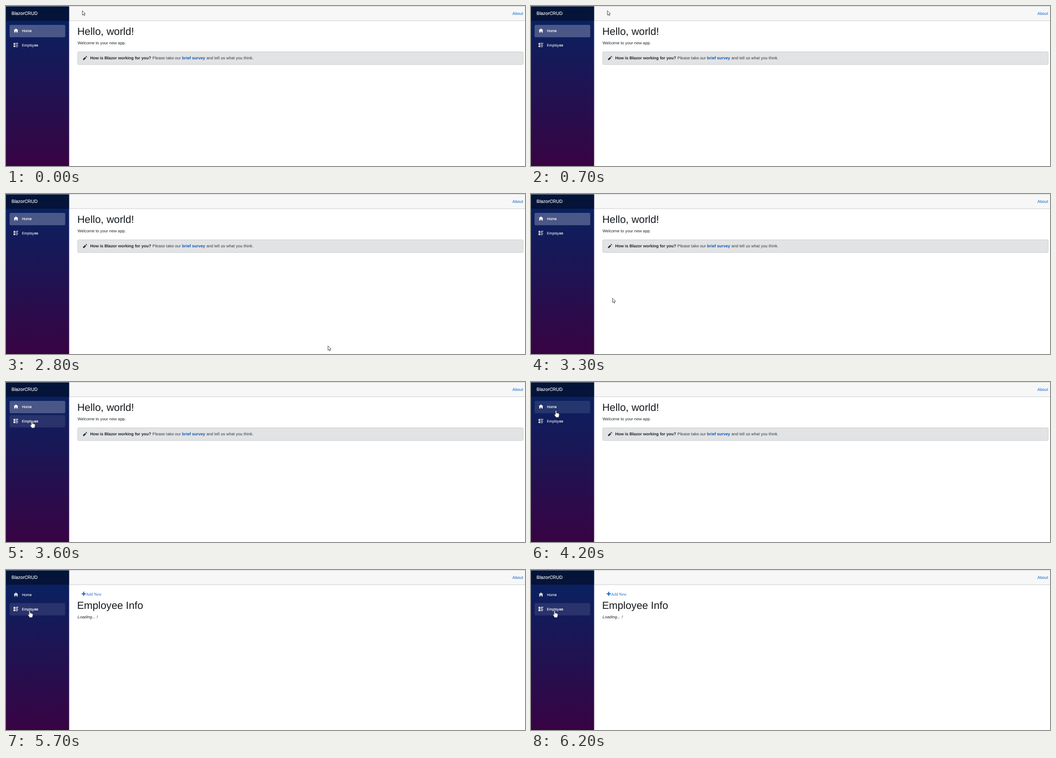
Write an HTML page that moves like this. It is 934 by 288 pixels and loops after 8 s.

```html
<!DOCTYPE html>
<html lang="en">
<head>
<meta charset="utf-8">
<title>BlazorCRUD</title>
<style>
  html, body { margin: 0; width: 100%; height: 100%; overflow: hidden; background: #fff; }
  svg { display: block; width: 934px; height: 288px; }
  text {
    font: 7.35px "Liberation Sans", Arial, sans-serif;
    text-rendering: geometricPrecision;
    fill: #212529;
    white-space: pre;
  }
  .title { font-size: 18.6px; fill: #15191d; }
  .brand { font-size: 8.2px; fill: #fff; stroke: #fff; stroke-width: .12; }
  .nav text { font-size: 6.65px; fill: inherit; stroke: #fff; stroke-width: .1; }
  .bold { font-weight: bold; }
  .italic { font-style: italic; }
  .link { fill: #1062c6; }
  .serif { font-family: "Liberation Serif", "Times New Roman", serif; }
  .alert text { fill: #383d41; }
  .alert .bold { fill: #1f2225; }
  .alert .link { fill: #0b58b8; }
</style>
</head>
<body>
<svg viewBox="0 0 934 288">
  <defs>
    <linearGradient id="side" x1="0" y1="0" x2="0" y2="1">
      <stop offset="0" stop-color="#052463"/>
      <stop offset="1" stop-color="#380343"/>
    </linearGradient>
  </defs>

  <rect width="934" height="288" fill="#fff"/>
  <rect x="113.6" width="821" height="26" fill="#f7f7f7"/>
  <rect x="113.6" y="26" width="821" height="1" fill="#d6d5d5"/>
  <text class="link" x="911.3" y="15.9">About</text>

  <rect width="113.6" height="288" fill="url(#side)"/>
  <rect width="113.6" height="26.5" fill="#000" fill-opacity=".42"/>
  <rect width="934" height=".6" fill="#c4c4c8"/>
  <text class="brand" x="10" y="16.4">BlazorCRUD</text>

  <g class="nav" id="home">
    <rect x="6.4" y="34" width="100.2" height="22.2" rx="2" fill="#fff"/>
    <path transform="translate(13.8 40.6) scale(1.03)" d="M4 0L0 3h1v4h2V5h2v2h2V3h1z"/>
    <text x="28.5" y="47.2">Home</text>
  </g>
  <g class="nav" id="employee">
    <rect x="6.4" y="59.6" width="100.2" height="22.2" rx="2" fill="#fff"/>
    <path transform="translate(13.6 66.6) scale(1.05)"
      d="M0 0v3h3V0zM4 0v1h4V0zM4 2v1h3V2zM0 4v3h3V4zM4 4v1h4V4zM4 6v1h3V6z"/>
    <text x="28.5" y="72.9">Employee</text>
  </g>

  <g id="welcome">
    <text class="title" x="128.2" y="52">Hello, world!</text>
    <text x="128.8" y="68.6">Welcome to your new app.</text>
    <g class="alert">
      <rect x="129" y="82.5" width="801.8" height="22.8" rx="2" fill="#e2e3e5" stroke="#c6c8cc" stroke-width=".8"/>
      <path transform="translate(138.7 89.8) scale(.92)" fill="#26292c" d="M6 0L5 1l2 2 1-1zM4 2L0 6v2h2l4-4z"/>
      <text class="bold" x="151.5" y="96.2">How is Blazor working for you?</text>
      <text x="263.6" y="96.2">Please take our</text>
      <text class="bold link" x="316.8" y="96.2">brief survey</text>
      <text x="360.7" y="96.2">and tell us what you think.</text>
    </g>
  </g>

  <g id="info">
    <path class="link" transform="translate(136.2 39.2) scale(.92)" d="M3 0v3H0v2h3v3h2V5h3V3H5V0z"/>
    <text class="link serif" x="143.7" y="46.4">Add New</text>
    <text class="title" x="127.9" y="70">Employee Info</text>
    <text class="italic" x="128.8" y="87">Loading... !</text>
  </g>

  <path id="arrow" fill="#fff" stroke="#333" stroke-width=".75" stroke-linejoin="round"
    d="M.4.4V8.3L2.2 6.6 3.5 9.5 4.8 8.9 3.6 6.1H6z"/>
  <g id="hand">
    <path transform="translate(.5 -.6) scale(1.15)" fill="#fff" stroke="#222" stroke-width=".5" stroke-linejoin="round"
      d="M-.9.8C-.9-.2.7-.2.7.8V4C1.2 3.5 2.1 3.7 2.2 4.3 2.8 3.9 3.6 4.1 3.7 4.8 4.4 4.4 5 4.9 5 5.6V7.6C5 9 4.2 9.6 4.1 10.7H-.2C-.3 9.5-2 8.2-2.6 6.6-2.7 5.6-1.6 5.5-.9 6.6z"/>
  </g>
</svg>
<script>
  const LOOP = 8000, STEP = 100, PAGE_AT = 5700;
  const AWAY_FROM = 2500, AWAY_TO = 2800;
  const byId = id => document.getElementById(id);
  const [home, employee, welcome, info, arrow, hand] =
    ["home", "employee", "welcome", "info", "arrow", "hand"].map(byId);

  // Each move is a quadratic curve: start point, control point, end point.
  const moves = [
    { from: 500, to: 700, curve: [[137, 8], [147, 16], [137, 8]] },
    { from: 1300, to: 1700, curve: [[137, 8], [563, 116], [553, 121]] },
    { from: 1700, to: 2200, curve: [[553, 121], [660, 100], [665, 166]] },
    { from: 2200, to: 2300, curve: [[665, 166], [676, 172], [687, 178]] },
    { from: 2800, to: 3600, curve: [[579, 273], [100, 258], [46, 71]] },
    { from: 3900, to: 4700, curve: [[46, 71], [44, 29.6], [42, 73.7]] }
  ];

  function pointerAt(time) {
    const t = Math.floor(time / STEP) * STEP;
    const { from, to, curve: [a, b, c] } = moves.filter(m => m.from <= t).pop() || moves[0];
    const u = Math.min(1, Math.max(0, (t - from) / (to - from))), v = 1 - u;
    return a.map((_, i) => v * v * a[i] + 2 * u * v * b[i] + u * u * c[i]);
  }

  const show = (el, on) => el.setAttribute("display", on ? "inline" : "none");

  function drawLink(el, active, hover) {
    el.setAttribute("fill", active || hover ? "#fff" : "#d7d7d7");
    el.firstElementChild.setAttribute("fill-opacity", hover ? .1 : active ? .25 : 0);
  }

  function render(t) {
    const [x, y] = pointerAt(t), opened = t >= PAGE_AT;
    const present = t < AWAY_FROM || t >= AWAY_TO;
    const over = top => x > 6 && x < 107 && y >= top && y <= top + 22.2;
    const onHome = over(34), onEmployee = over(59.6), onLink = onHome || onEmployee;

    drawLink(home, !opened, onHome);
    drawLink(employee, opened, onEmployee);
    show(welcome, !opened);
    show(info, opened);
    show(arrow, present && !onLink);
    show(hand, onLink);
    (onLink ? hand : arrow).setAttribute("transform", `translate(${x} ${y})`);
  }

  const begin = performance.now();
  function tick() {
    render((performance.now() - begin) % LOOP);
    requestAnimationFrame(tick);
  }
  tick();
</script>
</body>
</html>
```
